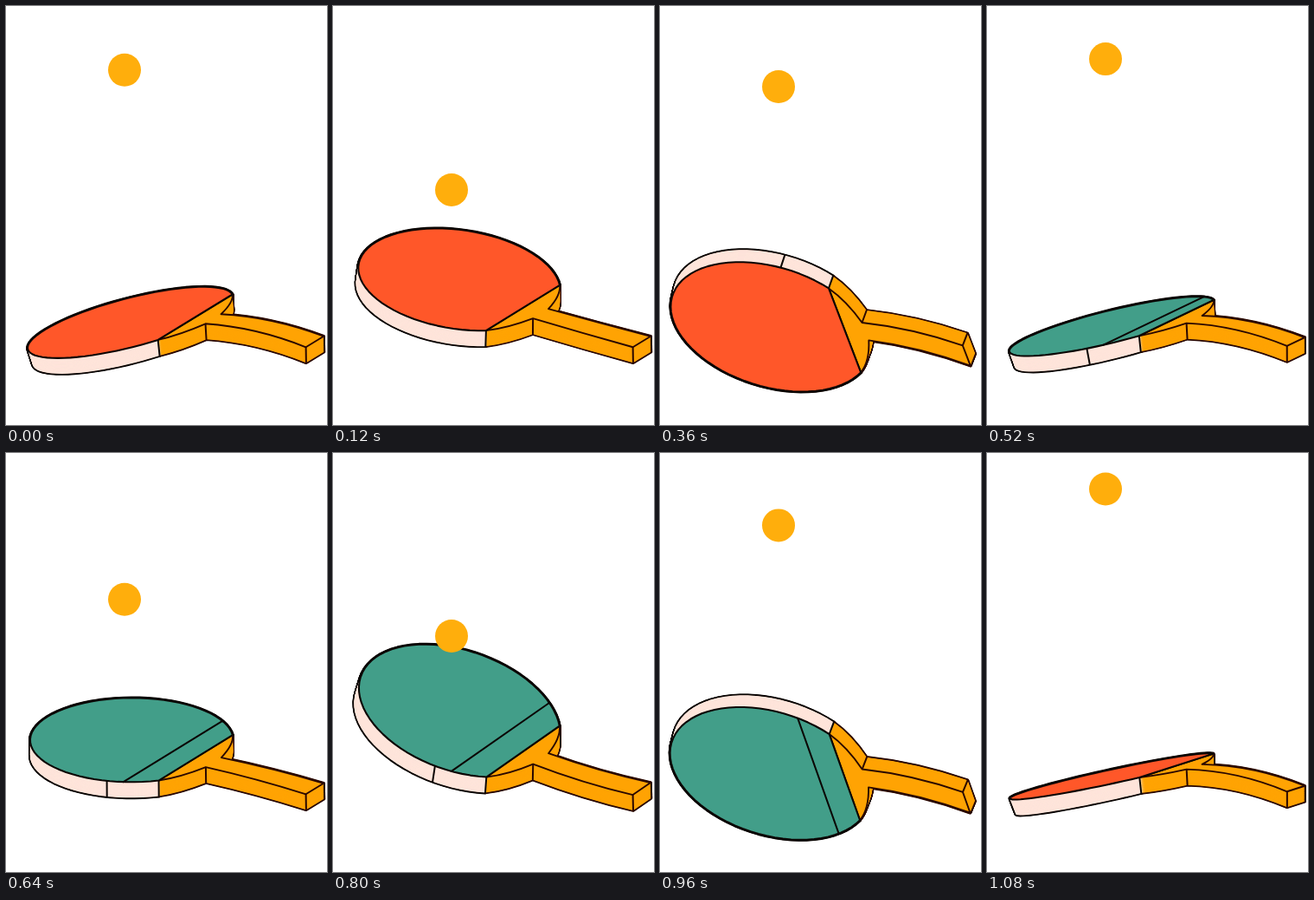
An HTML page with a canvas for the animation above (1120 ms loop, 371 by 483 pixels).

```html
<!DOCTYPE html>
<html>
<head>
<meta charset="utf-8">
<style>
html, body { margin: 0; width: 371px; height: 483px; overflow: hidden; background: #fff; }
canvas { display: block; }
</style>
</head>
<body>
<canvas id="c" width="371" height="483"></canvas>
<script>
const ctx = document.getElementById('c').getContext('2d');
const RED = '#ff5729', GREEN = '#429e89', RIM = '#fee4da', WOOD = '#ffa303', BALL = '#ffae0c';
const INK = '#0a0503', WOOD_INK = '#2a0800';
const STEP = 40, STEPS = 28, LAYERS = 40;

// The blade is a unit circle cut by a chord, seen through two axes:
// "along" points to the tip, "across" runs parallel to the chord.
const CHORD = -.76, STRIPE = -.49, MARK = -.34;
const half = u => Math.sqrt(1 - u * u);
const mix = (a, b, t) => a + (b - a) * t;
const smooth = t => { t = Math.min(1, Math.max(0, t)); return t * t * (3 - 2 * t); };

// One half turn for x from 0 to 1: the paddle tips up, then swings over.
function pose(x) {
  const turn = Math.PI * (.06 * Math.min(1, x / .07) + .94 * smooth((x - .45) / .48));
  const cos = Math.cos(turn), sin = Math.sin(turn), open = sin * sin;
  const lift = -23 - 40 * Math.cos(2 * Math.PI * (x - .463)) + 14 * open;
  return {
    along: [-96.5 - 24 * open, lift],
    across: [65 * cos + 10 * sin, -21 * cos - 105 * sin],
    chord: [219.5 - 5 * open, 368 + .21 * (lift - 10) + 3 * open],
    neck: [240, 370 + .12 * (lift - 10)],
    end: [357, 396],
    thick: 18 * Math.sin(Math.PI / 2 * cos),
    slide: 8 * open,
    splay: (5 + .2 * lift) * cos,
    bend: -4 - .1 * lift
  };
}

// Moves a point of the middle plane to a layer, -.5 (front) to .5 (back).
const toLayer = (p, [x, y], layer) =>
  [x + layer * (p.slide + p.splay * (1 - x / 350) ** 2), y + layer * p.thick];

const bladePoint = (p, u, v, layer) => toLayer(p,
  [0, 1].map(i => p.chord[i] + (u - CHORD) * p.along[i] + v * p.across[i]), layer);

const handlePoint = (p, base, w, layer) => toLayer(p,
  [0, 1].map(i => base[i] + w * half(CHORD) * p.across[i]), layer);

function bladePath(p, layer) {
  const start = Math.acos(CHORD);
  ctx.beginPath();
  for (let i = 0; i <= 60; i++) {
    const a = start * (1 - i / 30);
    ctx.lineTo(...bladePoint(p, Math.cos(a), Math.sin(a), layer));
  }
  ctx.closePath();
}

function handlePath(p, layer) {
  const at = (base, w) => handlePoint(p, base, w, layer);
  const shoulder = [0, 1].map(i => mix(p.chord[i], p.neck[i], .65));
  const bent = (a, b) => ctx.quadraticCurveTo((a[0] + b[0]) / 2, (a[1] + b[1]) / 2 + 2 * p.bend, ...b);
  ctx.beginPath();
  ctx.moveTo(...at(p.chord, -1));
  ctx.quadraticCurveTo(...at(shoulder, -.72), ...at(p.neck, -.21));
  bent(at(p.neck, -.21), at(p.end, -.24));
  ctx.lineTo(...at(p.end, .24));
  bent(at(p.end, .24), at(p.neck, .21));
  ctx.quadraticCurveTo(...at(shoulder, .72), ...at(p.chord, 1));
  ctx.closePath();
}

function fill(color) { ctx.fillStyle = color; ctx.fill(); }
function stroke(color, width) { ctx.strokeStyle = color; ctx.lineWidth = width; ctx.stroke(); }
function line(a, b, color) {
  ctx.beginPath();
  ctx.moveTo(...a);
  ctx.lineTo(...b);
  stroke(color, 2);
}

function drawPaddle(p, frontIsRed) {
  const { along, across } = p;
  const frontSeen = along[0] * across[1] > along[1] * across[0];
  const near = frontSeen ? -.5 : .5;
  const green = frontIsRed !== frontSeen;
  const edge = -Math.sign(across[1] * near * p.thick) || 1;
  const layers = Array.from({ length: LAYERS + 1 }, (_, i) => mix(-near, near, i / LAYERS));

  for (const l of layers) {
    bladePath(p, l); stroke(INK, 3.8);
    handlePath(p, l); stroke(WOOD_INK, 3.6);
  }
  for (const l of layers) { bladePath(p, l); fill(RIM); }
  for (const l of layers) { handlePath(p, l); fill(WOOD); }

  const edgeLine = (point, base, w, color) => line(point(p, base, w, near), point(p, base, w, -near), color);
  edgeLine(handlePoint, p.chord, edge, INK);
  edgeLine(handlePoint, p.neck, .21 * edge, WOOD_INK);
  edgeLine(handlePoint, p.end, .24 * edge, WOOD_INK);
  if (frontIsRed === edge > 0) edgeLine(bladePoint, MARK, edge * half(MARK), INK);

  handlePath(p, near); fill(WOOD); stroke(WOOD_INK, 1.9);
  bladePath(p, near); fill(green ? GREEN : RED); stroke(INK, 2.1);
  if (green) line(bladePoint(p, STRIPE, half(STRIPE), near), bladePoint(p, STRIPE, -half(STRIPE), near), INK);
}

// Steps at which the ball is highest and lowest, in turn.
const turns = [-1, 4.2, 12.2, 18.5, 27];
function ballY(k) {
  const i = turns.findIndex(t => t >= k);
  const t = (k - turns[i - 1]) / (turns[i] - turns[i - 1]);
  return mix(41.5, 275, i % 2 ? t ** 1.2 : (1 - t) ** 1.65);
}

function draw() {
  const k = Math.floor(performance.now() / STEP) % STEPS;
  const firstHalf = k < 12.4;
  ctx.fillStyle = '#fff';
  ctx.fillRect(0, 0, 371, 483);
  drawPaddle(pose(firstHalf ? (k + 1) / 13.4 : (k - 12.4) / 15.6), firstHalf);
  ctx.beginPath();
  ctx.arc(137, ballY(k), 19, 0, Math.PI * 2);
  fill(BALL);
  requestAnimationFrame(draw);
}

ctx.lineJoin = ctx.lineCap = 'round';
draw();
</script>
</body>
</html>
```
